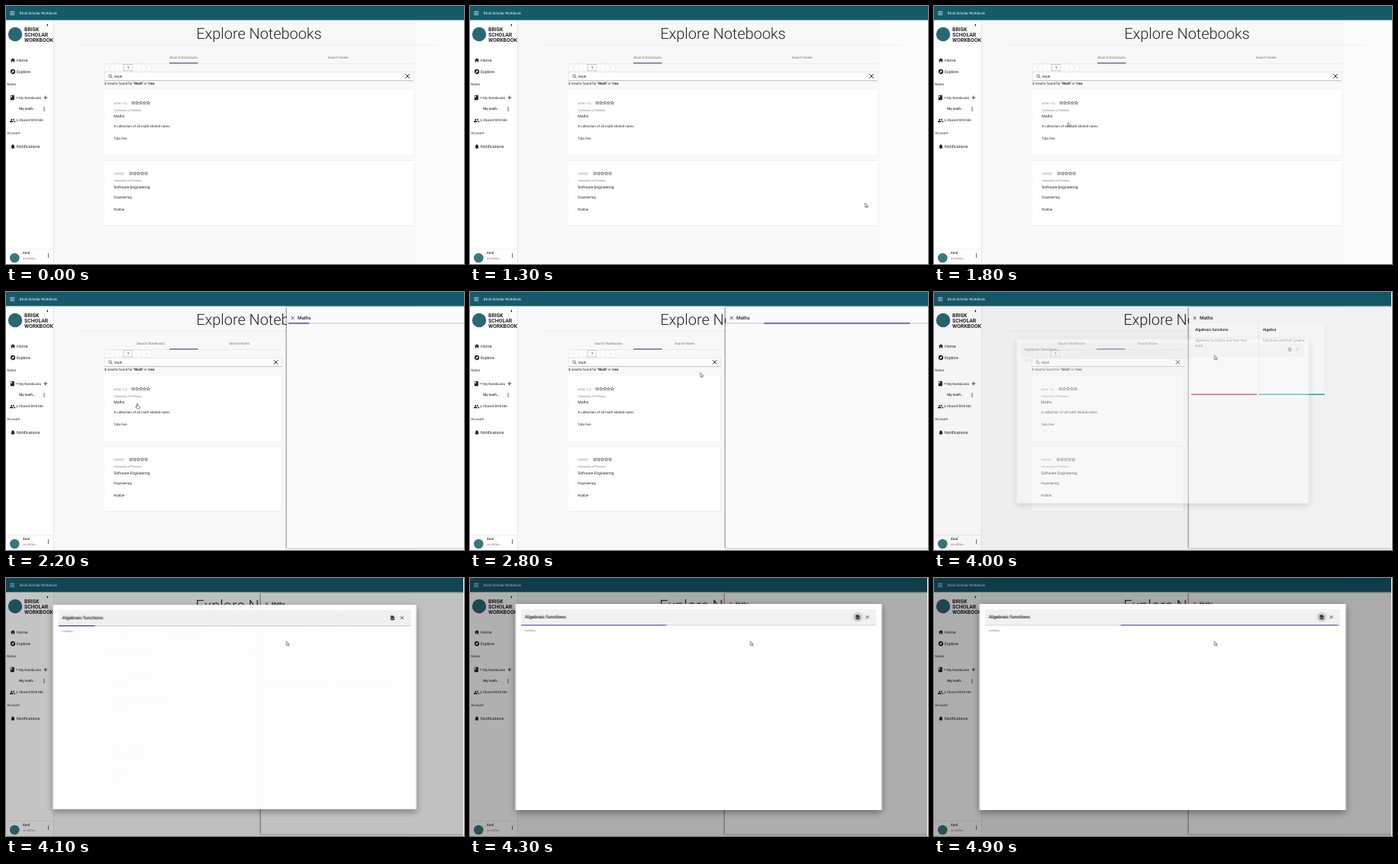
An HTML page that plays this animation: 600 px wide and 338 px high, repeating every 5 s.

```html
<!DOCTYPE html>
<html lang="en">
<head>
<meta charset="utf-8">
<title>Explore Notebooks</title>
<style>
  html, body { margin: 0; width: 100%; height: 100%; overflow: hidden; background: #fff; }
  #stage { display: block; width: 100vw; height: 100vh; }
  text { font-family: Roboto, sans-serif; font-size: 4.5px; fill: #222; text-rendering: geometricPrecision; white-space: pre; }
  .nav { font-size: 5.4px; }
  .small { font-size: 3.9px; fill: #808080; }
  .name { font-size: 5px; }
  .strong { font-weight: 500; }
  .muted { fill: #757575; }
  .mid { text-anchor: middle; }
  .brand { font-size: 6.9px; font-weight: 700; }
  .heading { font-size: 19.9px; font-weight: 300; text-anchor: middle; }
  .panel-title { font-size: 6.2px; font-weight: 500; }
  .body { font-size: 4.6px; fill: #757575; }
  .paper { fill: #fff; filter: drop-shadow(0 .5px .7px rgba(0,0,0,.24)); }
  .line { fill: none; stroke: #222; stroke-width: .8; }
  .cursor { fill: #fff; stroke: #222; stroke-width: .55; stroke-linejoin: round; }
</style>
</head>
<body>
<svg id="stage" viewBox="0 0 600 338"></svg>
<script>
const LOOP = 5000, TICK = 100;

const shapes = {
  home: 'M10 20v-6h4v6h5v-8h3L12 3 2 12h3v8z',
  compass: 'M12 2a10 10 0 1 0 0 20 10 10 0 1 0 0-20zM14.2 14.2 6 18l3.8-8.2L18 6z',
  bell: 'M12 22a2 2 0 0 0 2-2h-4a2 2 0 0 0 2 2zm6-6v-5c0-3.1-1.6-5.6-4.5-6.3V4a1.5 1.5 0 0 0-3 0v.7C7.6 5.4 6 7.9 6 11v5l-2 2v1h16v-1z',
  book: 'M18 2H6a2 2 0 0 0-2 2v16a2 2 0 0 0 2 2h12a2 2 0 0 0 2-2V4a2 2 0 0 0-2-2zM6 4h5v8l-2.5-1.5L6 12z',
  people: 'M16 11a3 3 0 1 0 0-6 3 3 0 0 0 0 6zM8 11a3 3 0 1 0 0-6 3 3 0 0 0 0 6zM8 13c-2.3 0-7 1.2-7 3.5V19h14v-2.5C15 14.2 10.3 13 8 13zM16 13c2 1 2 2 2 3.5V19h5v-2.5c0-2.3-4.7-3.5-7-3.5z',
  doc: 'M14 2H6a2 2 0 0 0-2 2v16a2 2 0 0 0 2 2h12a2 2 0 0 0 2-2V8zM11 11h2v3h3v2h-3v3h-2v-3H8v-2h3z'
};

const text = (x, y, words, cls = '') => `<text x="${x}" y="${y}" class="${cls}">${words}</text>`;
const rect = (x, y, w, h, fill, extra = '') => `<rect x="${x}" y="${y}" width="${w}" height="${h}" fill="${fill}" ${extra}/>`;
const stroke = (d, extra = '') => `<path class="line" d="${d}" ${extra}/>`;
const icon = (kind, x, y, size) =>
  `<path d="${shapes[kind]}" fill="#222" fill-rule="evenodd" transform="translate(${x} ${y}) scale(${size / 24}) translate(-12 -12)"/>`;
const cross = (x, y, r, extra) => stroke(`M${x - r} ${y - r}l${2 * r} ${2 * r}m0 ${-2 * r}l${-2 * r} ${2 * r}`, extra);
const dots = (x, y) => [-2, 0, 2].map(dy => `<circle cx="${x}" cy="${y + dy}" r=".65" fill="#222"/>`).join('');

function star(cx, cy) {
  const points = Array.from({ length: 10 }, (_, i) => {
    const r = i % 2 ? 1 : 2.3, a = i * Math.PI / 5;
    return `${(cx + r * Math.sin(a)).toFixed(2)},${(cy - r * Math.cos(a)).toFixed(2)}`;
  });
  return `<polygon class="line" style="stroke-width:.5" points="${points.join(' ')}"/>`;
}

function result(y, code, starX, title, summary, author) {
  return `<rect class="paper wide" x="129" y="${y}" width="405" height="85"/>` +
    text(141.3, y + 18.9, code, 'small') +
    [0, 1, 2, 3, 4].map(i => star(starX + i * 4.95, y + 17)).join('') +
    text(141.3, y + 27.9, 'University of Pretoria', 'small') +
    text(141.3, y + 36.2, title, 'name') +
    text(141.3, y + 49, summary) +
    text(141.3, y + 65.3, author);
}

function noteCard(x, title, lines, color) {
  return `<rect class="paper" x="${x}" y="41" width="86" height="94"/>` + rect(x, 133.4, 86, 1.6, color) +
    text(x + 5, 51.4, title, 'name strong') +
    lines.map((line, i) => text(x + 5, 64.7 + i * 7.7, line, 'body')).join('');
}

const loader = (id, x, y, width) =>
  `<svg x="${x}" y="${y}" width="${width}" height="1.4">${rect(0, 0, width, 1.4, '#c3d3e8')}
   <rect id="${id}" width="${width}" height="1.4" fill="#3130a0"/></svg>`;

const sidebar = rect(0, 18, 62.5, 320, '#fff') + rect(62, 18, .7, 320, '#dcdcdc') +
  '<circle cx="12" cy="37" r="9.2" fill="#2a6675"/>' +
  text(24, 33.2, 'BRISK', 'brand') + text(24, 40.3, 'SCHOLAR', 'brand') + text(24, 47.3, 'WORKBOOK', 'brand') +
  '<path d="M55 23.3v3.4l-1.9-1.7z" fill="#222"/>' +
  icon('home', 9, 71, 7.6) + text(14, 72.7, 'Home', 'nav') +
  icon('compass', 9, 86, 7.6) + text(14, 87.6, 'Explore', 'nav') +
  text(1.3, 104.2, 'Notes') +
  icon('book', 8.3, 120, 7.6) + stroke('M13 119.2l1.5 1.5 1.5-1.5') + text(17, 121.5, 'My Notebooks') +
  stroke('M49.3 120h5m-2.5-2.5v5') +
  text(17.3, 136.4, 'My math...', 'strong') + dots(50, 135) +
  icon('people', 8.5, 150, 8) + stroke('M13.6 148.3l1.6 1.6-1.6 1.6') + text(17, 151.4, 'Shared With Me') +
  text(1.3, 168.3, 'Account') +
  icon('bell', 9, 184, 7.6) + text(14, 185.7, 'Notifications', 'nav') +
  rect(0, 318, 62, .6, '#e2e2e2') + '<circle cx="11.3" cy="330" r="6.3" fill="#3b7583"/>' +
  text(22.3, 325, 'Emil', 'strong') + text(22.3, 332.4, 'emil42ka...', 'small') + dots(55.5, 327);

const pager = ['«', '‹', '1', '›', '»'].map((sign, i) => {
  const x = 130 + i * 12, on = i === 2;
  return rect(x, 76.3, 12, 8.6, '#fdfdfd', `stroke="${on ? '#999' : '#e8e8e8'}" stroke-width=".5"`) +
    `<text x="${x + 6}" y="82.2" class="mid${on ? ' strong' : ''}" style="fill:${on ? '#222' : '#bbb'}">${sign}</text>`;
}).join('');

const main = rect(62, 18, 476, 320, '#f8f8f9') + rect(537, 18, 63, 320, '#fcfcfc') +
  text(331.5, 42.6, 'Explore Notebooks', 'heading') +
  rect(97, 51.2, 468, .6, '#e6e6e6') +
  '<g id="tabBooks"><text y="69.2" class="mid muted">Search Notebooks</text></g>' +
  '<g id="tabNotes"><text y="69.2" class="mid muted">Search Notes</text></g>' +
  rect(129, 75.2, 405, .6, '#e2e2e2', 'class="wide"') + rect(214, 74.2, 37.5, 1.2, '#4b5688') +
  pager +
  rect(129, 86.3, 405, 11.4, '#fff', 'class="wide" stroke="#d5d5d5" stroke-width=".6"') +
  rect(129, 97.3, 405, .8, '#bdbdbd', 'class="wide"') +
  '<circle class="line" cx="136.4" cy="91.6" r="1.7" style="stroke-width:.6"/>' + stroke('M137.6 92.9l1.7 1.7') +
  text(142, 93.6, 'Math', '') +
  `<g id="clear">${cross(0, 92, 2.8, 'style="stroke-width:1"')}</g>` +
  '<text x="129" y="102.8"><tspan class="strong">2</tspan> results found for <tspan font-weight="700">"Math"</tspan> in <tspan font-weight="700">1ms</tspan></text>' +
  result(110, 'MTW 114', 166.6, 'Maths', 'A collection of all math related notes', 'Tobi Fen') +
  result(202.5, 'COS301', 163.8, 'Software Engineering', 'Engineering', 'Robbie');

const drawer = `<g id="drawer"><rect x="0" y="20" width="270" height="315.5" fill="#fbfbfb"
    style="filter:drop-shadow(-.4px .4px 1.2px rgba(0,0,0,.45))"/>` +
  cross(7.6, 34, 1.9) + text(14, 35.5, 'Maths', 'panel-title') +
  `<g id="drawerLoad">${loader('drawerBar', 2, 40.3, 263)}</g>` +
  `<g id="cards">${noteCard(3, 'Algebraic functions', ['Algebraic functions and how they', 'work'], '#d4235f')}
   ${noteCard(91.8, 'Algebra', ['Functions and their graphs'], '#31b39b')}</g></g>`;

const dialog = '<g id="dialog"><g transform="translate(-299.5 -169)">' +
  rect(59.5, 34, 480, 270, '#fefefe', 'style="filter:drop-shadow(0 3px 5px rgba(0,0,0,.4))"') +
  rect(67, 41, 465, 21, '#f1f1f2') + text(71.8, 53.4, 'Algebraic functions', 'panel-title') +
  '<circle id="focus" cx="508" cy="51.2" r="6.3" fill="#cfcfd1"/>' + icon('doc', 508, 51.2, 7.2) + cross(520.5, 51.2, 2) +
  loader('dialogBar', 67, 61.2, 465) + text(71.5, 70.4, 'Loading...', 'small') + '</g></g>';

const stage = document.getElementById('stage');
stage.innerHTML = rect(0, 0, 600, 338, '#fff') + `<g id="page">${main}${drawer}</g>` + sidebar +
  rect(0, 0, 600, 18.5, '#155a6b') + stroke('M5.3 7.4h6m-6 2h6m-6 2h6', 'style="stroke:#fff;stroke-width:.7"') +
  '<text x="17.8" y="10.9" style="fill:#fff;font-size:4.65px">Brisk Scholar Workbook</text>' +
  '<rect id="backdrop" width="600" height="338" fill="#000"/>' + dialog +
  '<rect id="edge" x="599" width="1" height="338" fill="#fff"/>' +
  `<g id="pointer"><path id="arrow" class="cursor" d="M0 0V5.6l1.3-1.1 1 2 .9-.4-.9-1.9h1.7z"/>
   <path id="hand" class="cursor" d="M-.6 4V.6a.6.6 0 0 1 1.2 0V2.8l2 .5q.8.3.7 1l-.5 2.6H-.4l-2-2.6q.4-.9 1.8.4z"/></g>`;

const animations = [];
function add(selector, frames, timing) {
  for (const node of document.querySelectorAll(selector)) {
    const animation = node.animate(frames, { fill: 'both', ...timing });
    animation.pause();
    animations.push(animation);
  }
}

// Steps are [ms, value]; the first and last values hold to the ends of the loop.
function play(selector, prop, steps, format = v => v) {
  const held = [[0, steps[0][1]], ...steps, [LOOP, steps.at(-1)[1]]];
  add(selector, held.map(([at, v]) => ({ offset: at / LOOP, [prop]: format(v) })), { duration: LOOP });
}
const move = ([x, y]) => `translate(${x}px, ${y}px)`;
const slide = x => move([x, 0]);

function show(selector, ...spans) {
  const steps = [[1, 0]];
  for (const [from, to] of spans) {
    steps.push([from - 1, 0], [from, 1]);
    if (to) steps.push([to - 1, 1], [to, 0]);
  }
  play(selector, 'opacity', steps);
}

const drawerLeft = [[2000, 606], [2100, 473], [2200, 368], [2300, 340], [2400, 335.6], [2500, 335]];
const contentWidth = drawerLeft.map(([at, x]) => [at, Math.min(405, x - 135.5)]);
play('#drawer', 'transform', drawerLeft, slide);
play('.wide', 'width', contentWidth, w => `${w}px`);
play('#clear', 'transform', contentWidth, w => slide(121 + w));
play('#tabBooks', 'transform', contentWidth, w => slide(131.5 + w / 4));
play('#tabNotes', 'transform', contentWidth, w => slide(131.5 + w * 3 / 4));
play('#page', 'transform', [[3800, 0], [3900, -1]], slide);
show('#drawerLoad', [2100, 3300]);
show('#cards', [3300]);
show('#edge', [3900]);

play('#backdrop', 'opacity', [[3900, 0], [4000, .04], [4100, .23], [4200, .29], [4300, .31], [4400, .32]]);
play('#dialog', 'opacity', [[3900, 0], [4000, .34], [4100, .98], [4200, 1]]);
play('#dialog', 'transform', [[3900, .7], [4000, .798], [4100, .992], [4200, 1]],
  s => `translate(299.5px, 169px) scale(${s})`);
show('#focus', [4200]);

show('#pointer', [1300]);
show('#hand', [1900, 2400], [3300, 3600]);
show('#arrow', [1300, 1900], [2400, 3300], [3600]);
play('#pointer', 'transform', [
  [1300, [517.6, 258]], [1400, [465, 240]], [1500, [375, 208]], [1600, [275, 176]], [1700, [200, 157]],
  [1800, [175.5, 152.4]], [1900, [172, 146]], [2200, [172, 146]], [2600, [235, 125]], [2900, [335, 96]],
  [3100, [361.3, 85.5]], [3300, [361.3, 85.5]], [3400, [367.3, 82.7]]
], move);

// Indeterminate bar: position in percent of the track, scale of its length.
const bezier = (...p) => `cubic-bezier(${p})`;
const travel = [
  [0, 0, bezier(.15, 0, .515, .41)], [.25, 37.65, bezier(.31, .284, .8, .734)],
  [.4835, 84.39, bezier(.4, .627, .6, .902)], [1, 160.28, 'linear']
];
const stretch = [
  [0, .08, bezier(.205, .057, .577, .454)], [.1915, .457, bezier(.152, .196, .648, 1.004)],
  [.4415, .728, bezier(.258, -.003, .212, 1.382)], [1, .08, 'linear']
];
function runBar(selector, width, delay) {
  const timing = { duration: 2300, delay };
  add(selector, travel.map(([offset, p, easing]) => ({ offset, easing, translate: `${(p - 54.89) * width / 100}px` })), timing);
  add(selector, stretch.map(([offset, s, easing]) => ({ offset, easing, scale: `${s} 1` })), timing);
}
runBar('#drawerBar', 263, 1800);
runBar('#dialogBar', 465, 3700);

const start = performance.now();
function draw() {
  const elapsed = (performance.now() - start) % LOOP;
  const time = Math.floor(elapsed / TICK) * TICK;
  for (const animation of animations) animation.currentTime = time;
  requestAnimationFrame(draw);
}
draw();
</script>
</body>
</html>
```
